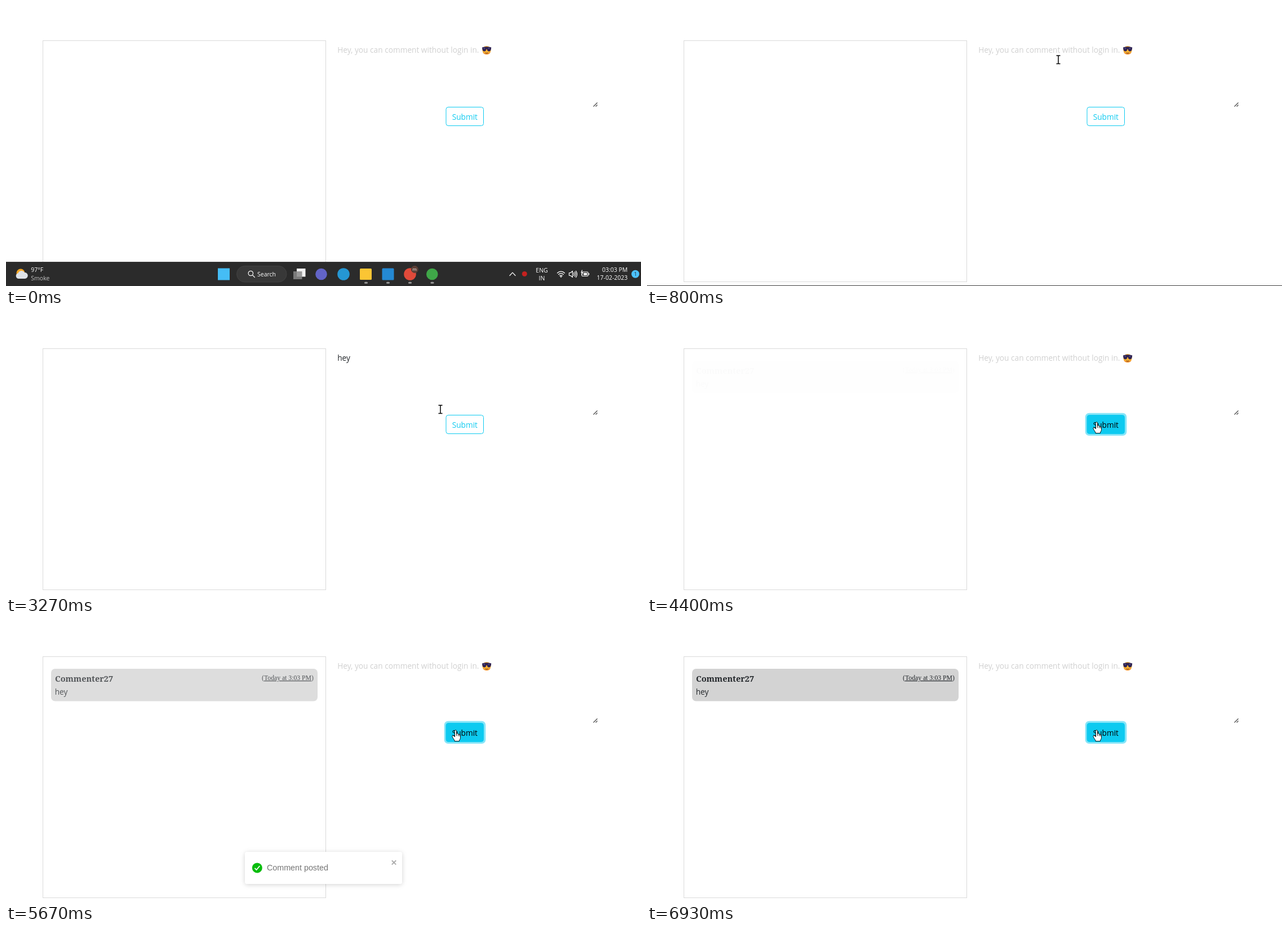
An HTML page that plays this animation: 1127 px wide and 497 px high, repeating every 6.99 s.

```html
<!DOCTYPE html>
<html lang="en">
<head>
<meta charset="utf-8">
<title>Comment box</title>
<style>
  html, body { margin: 0; width: 100%; height: 100%; overflow: hidden; background: #fff; }
  svg { display: block; width: 100%; height: 100%; }
  text { font-family: "Open Sans", "Noto Sans", sans-serif; font-size: 13.7px; white-space: pre; }
  .name { font: bold 14.5px "Noto Serif", serif; }
  .time { font: 11.7px "Liberation Serif", serif; }
  .toast { font: 14.3px "Liberation Sans", sans-serif; }
  #bar text { font-size: 10.5px; fill: #fff; }
  #bar .dim { fill: #c4c4c4; }
  #bar .line { fill: none; stroke: #fff; stroke-width: 1.2; stroke-linecap: round; stroke-linejoin: round; }
  #card { filter: drop-shadow(0 1px 4px rgba(0,0,0,.13)) drop-shadow(0 2px 5px rgba(0,0,0,.05)); }
  .hide { display: none; }
  #box { fill: #fff; stroke: #0dcaf0; }
  #label { fill: #0dcaf0; }
  .hover #box { fill: #0dcaf0; }
  .hover #label { fill: #000; }
</style>
</head>
<body>
<svg viewBox="0 0 1127 497">
  <rect x="65.5" y="61.5" width="502" height="428" fill="#fff" stroke="#dadada"/>

  <g id="comment">
    <rect x="80" y="83" width="473" height="57.5" rx="7" fill="#d3d3d3"/>
    <g fill="#212529">
      <text class="name" x="87" y="106">Commenter27</text>
      <text class="time" x="545.8" y="103" text-anchor="end">(<tspan text-decoration="underline">Today at 3:03 PM</tspan>)</text>
      <text x="86.7" y="129">hey</text>
    </g>
  </g>

  <g id="hint">
    <text x="588.2" y="83.3" fill="#d0d0d0">Hey, you can comment without login in.</text>
    <circle cx="853" cy="78.5" r="7.6" fill="#f9b233"/>
    <path d="M846 81.5a7.6 7.6 0 0 0 14 0q-7 5-14 0z" fill="#ee8f2d"/>
    <path d="M845 73.5q8-2.4 16.300 0l-.5 3.500q-.8 3.500-3.700 3.500t-3.400-3.700h-1.200q-.5 3.700-3.400 3.700t-3.700-3.500z" fill="#2f2353"/>
    <path d="M847.500 75l2.500 0M855.700 75l2.500 0" stroke="#6b6fae" stroke-width="1.200"/>
    <path d="M850.500 83q2.700 1.600 5.200 0" fill="none" stroke="#6d3b1f"/>
  </g>
  <text id="typed" x="588.2" y="83.3" fill="#212529"></text>
  <rect id="caret" y="69" width="1" height="18" fill="#111"/>
  <path d="M1042.500 178.500l7-7M1046.500 178.500l3-3" stroke="#444" stroke-width="1.200"/>

  <g id="button">
    <rect id="ring" x="777.700" y="175.700" width="73.600" height="40.300" rx="7" fill="#86e5f8"/>
    <rect id="box" x="781" y="179.500" width="66.500" height="33" rx="4"/>
    <text id="label" x="814.300" y="202" text-anchor="middle">Submit</text>
  </g>

  <g id="card">
    <rect x="424" y="408" width="279" height="57" rx="3.500" fill="#fff"/>
    <circle cx="445.800" cy="436.400" r="9" fill="#07bc0c"/>
    <path d="M441.500 436.800l3 3.200 5.800-7" fill="none" stroke="#fff" stroke-width="1.700"/>
    <text class="toast" x="463" y="441.300" fill="#757575">Comment posted</text>
    <path d="M684.800 423.200l7.400 7.400M692.200 423.200l-7.400 7.400" stroke="#adadad" stroke-width="2"/>
  </g>

  <g id="bar">
    <rect y="454" width="1127" height="43" fill="#2b2b2b"/>
    <rect y="454" width="1127" height="1" fill="#3c3c3c"/>
    <circle cx="26" cy="474" r="7.500" fill="#f6a623"/>
    <path d="M22 484a5 5 0 0 1-.5-9.800a6.500 6.500 0 0 1 11.500-1.200a5.500 5.500 0 0 1 .5 11z" fill="#dfe3e8"/>
    <text x="44.300" y="472">97°F</text>
    <text class="dim" x="44.300" y="486.500">Smoke</text>

    <rect x="376" y="465.500" width="21" height="21" fill="#45bdf5"/>
    <rect x="409.500" y="461.500" width="88.500" height="28.500" rx="14.200" fill="#383838" stroke="#424242"/>
    <circle class="line" cx="434.300" cy="474.500" r="4.200"/>
    <path class="line" d="M437.500 477.700l3.800 3.800"/>
    <text x="446" y="479.800">Search</text>
    <rect x="516" y="466" width="15.500" height="14.500" fill="#f2f2f2"/>
    <rect x="510" y="471" width="15.500" height="14" fill="#8a8a8a" opacity=".85"/>
    <circle cx="559.500" cy="476" r="10.300" fill="#6264c7"/>
    <circle cx="599" cy="476" r="10.800" fill="#2597d3"/>
    <rect x="628" y="466" width="21" height="20" rx="1.500" fill="#fbc534"/>
    <rect x="667.500" y="465.500" width="21" height="21" rx="1.500" fill="#2489d3"/>
    <circle cx="717" cy="476" r="10.800" fill="#e04a3a"/>
    <circle cx="725.300" cy="467.500" r="6.500" fill="#5d4037"/>
    <text x="725.300" y="470" text-anchor="middle" style="font-size:8px">m</text>
    <circle cx="756.300" cy="476" r="10.300" fill="#3fa648"/>
    <g fill="#9a9a9a">
      <rect x="636" y="489.700" width="6" height="3" rx="1.500"/>
      <rect x="675" y="489.700" width="6" height="3" rx="1.500"/>
      <rect x="714" y="489.700" width="6" height="3" rx="1.500"/>
      <rect x="753.500" y="489.700" width="6" height="3" rx="1.500"/>
    </g>

    <path class="line" d="M894 478.500l5-5.300 5 5.300"/>
    <circle cx="920.300" cy="475.500" r="4.500" fill="#c4211f"/>
    <text x="951" y="473" text-anchor="middle">ENG</text>
    <text x="951" y="486.800" text-anchor="middle">IN</text>
    <path class="line" d="M978.500 474a9 9 0 0 1 13 0M980.700 476.500a6 6 0 0 1 8.600 0M982.800 479a3 3 0 0 1 4.400 0"/>
    <circle cx="985" cy="480.500" r="1.200" fill="#fff"/>
    <path class="line" d="M999.500 473.500h2.500l3.500-3v11l-3.500-3h-2.500zM1007.500 473.500q1.800 2.500 0 5M1009.500 471.800q3 4.200 0 8.400M1011.500 470.300q4 5.700 0 11.400"/>
    <rect class="line" x="1022" y="472" width="11" height="7.500" rx="1.500"/>
    <rect x="1025" y="473.800" width="6.300" height="4" fill="#fff"/>
    <path class="line" d="M1034.700 474.500v2.500M1022.500 469l-1.500 4h2.500l-1.500 4"/>
    <text x="1103.300" y="472" text-anchor="end">03:03 PM</text>
    <text x="1103.300" y="486.300" text-anchor="end">17-02-2023</text>
    <circle cx="1117" cy="475.800" r="7" fill="#4cc2ff"/>
    <text x="1117" y="479" text-anchor="middle" style="font-size:9px;fill:#222">1</text>
  </g>
  <rect id="edge" y="496" width="1127" height="1" fill="#3a3a3a"/>

  <g id="cursor">
    <path id="beam" d="M-3.500 -7H-.7L0 -6.300L.7 -7H3.500M-3.500 7.500H-.7L0 6.800L.7 7.500H3.500M0 -6.500V7" fill="none" stroke="#000" stroke-width="1.500"/>
    <path id="arrow" d="M0 0V16l3.700-3.500 2.500 5.800 2.400-1-2.500-5.600h5z" fill="#fff" stroke="#000" stroke-width=".9"/>
    <path id="hand" d="M-1.500 .5Q0 -1 1.500 .5V6Q4 5 4.600 7Q6.500 6.500 7 8Q8.500 8 8.500 9.500V13Q8.500 16 6.500 18V19.500H-2V18Q-4.500 14.500 -6 11.500Q-6.300 9.500 -4.500 9.500Q-3 10 -1.500 12ZM1.500 6V10M4.600 7V10.500M7 8V11" fill="#fff" stroke="#000" stroke-width=".9"/>
  </g>
</svg>
<script>
const LOOP = 6990, ZOOM = 0.87;
const $ = id => document.getElementById(id);
const show = (id, on) => $(id).classList.toggle('hide', !on);
const within = (t, a, b) => t >= a && t < b;

// Pointer stops: time, x, y
const path = [
  [70, 1119, 488], [200, 1010, 372], [400, 815, 178], [540, 742, 108], [670, 730, 95],
  [3200, 730, 95], [3270, 771, 169], [3400, 815, 197], [3530, 857, 222],
  [3670, 838, 208], [3800, 803, 195], [3870, 798, 192]
];
const carets = [
  [870, 1330, 588.5], [1870, 2130, 588.5], [2130, 2270, 597],
  [2270, 2400, 604.5], [2400, 2930, 611.3], [3400, 3930, 611.3]
];
const typing = [[2130, 'h'], [2270, 'he'], [2400, 'hey'], [4130, '']];

function pointer(t) {
  const i = path.findIndex(p => p[0] > t);
  if (i < 0) return path[path.length - 1].slice(1);
  if (i === 0) return path[0].slice(1);
  const [a, b] = [path[i - 1], path[i]];
  const k = (t - a[0]) / (b[0] - a[0]);
  return [1, 2].map(n => a[n] + (b[n] - a[n]) * k);
}

const anims = [];
function track(id, frames, opts) {
  const a = $(id).animate(frames, { fill: 'both', ...opts });
  a.pause();
  anims.push(a);
}
const slide = (offset, y, opacity = 1) =>
  ({ offset, opacity, transform: `translateY(${y * ZOOM}px)` });

track('comment', { opacity: [0, 1] }, { delay: 4300, duration: 2900, easing: 'ease' });
track('ring', { opacity: [0, 1] }, { delay: 4000, duration: 150, easing: 'ease' });

const enter = [slide(0, 3000, 0), slide(.6, -20), slide(.75, 10), slide(.9, -5), slide(1, 0)]
  .map(f => ({ ...f, easing: 'cubic-bezier(.215,.61,.355,1)' }));
const leave = [slide(0, 0), slide(.2, 10), slide(.4, -20), slide(.45, -20), slide(1, 2000, 0)]
  .map(f => ({ ...f, easing: 'ease' }));
track('card', enter, { delay: 4520, duration: 750 });
track('card', leave, { delay: 6070, duration: 750, fill: 'forwards' });

function draw(t) {
  anims.forEach(a => a.currentTime = t);
  show('card', within(t, 4520, 6800));
  show('bar', t < 800);
  show('edge', within(t, 800, 870));

  const word = typing.filter(s => t >= s[0]).pop();
  $('typed').textContent = word ? word[1] : '';
  show('hint', !word || !word[1]);

  const caret = carets.find(c => within(t, c[0], c[1]));
  show('caret', caret);
  if (caret) $('caret').setAttribute('x', caret[2]);

  const [x, y] = pointer(t);
  const onButton = within(x, 781, 848) && within(y, 179, 213);
  const onField = within(x, 578, 1054) && within(y, 62, 179);
  $('cursor').setAttribute('transform', `translate(${Math.round(x)} ${Math.round(y)})`);
  show('cursor', t >= 70);
  show('hand', onButton);
  show('beam', onField);
  show('arrow', !onButton && !onField);
  $('button').classList.toggle('hover', onButton);
}

const start = performance.now();
function tick() {
  const now = (performance.now() - start) % LOOP;
  // 15 steps per second
  const step = Math.floor(now * 0.015 + 0.1);
  draw(Math.round(step * 20 / 3) * 10);
  requestAnimationFrame(tick);
}
tick();
</script>
</body>
</html>
```
